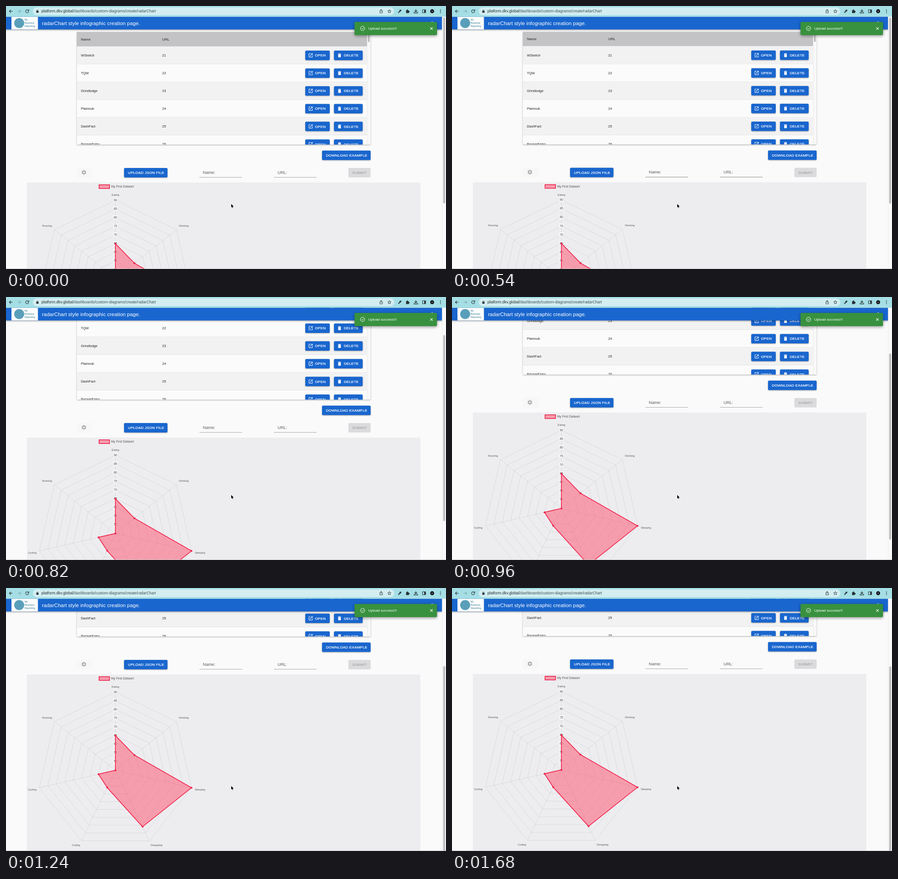
An HTML page with a canvas for the animation above (2.42 s loop, 969 by 578 pixels).

```html
<!DOCTYPE html>
<html lang="en">
<head>
<meta charset="utf-8">
<title>Radar chart page</title>
<style>
html, body { margin: 0; width: 100%; height: 100%; overflow: hidden; background: #fafafa; }
canvas { display: block; width: 969px; height: 578px; }
</style>
</head>
<body>
<canvas id="stage" width="969" height="578"></canvas>
<script>
const ctx = document.getElementById('stage').getContext('2d');
const W = 969, H = 578, LOOP = 2420, TAU = Math.PI * 2;
const FONT = '"Liberation Sans", Arial, sans-serif';
const BLUE = '#1966ce', INK = '#222224', PINK = '#ee1f49';

// time in ms, scroll offset in px
const KEYS = [[0, 0], [440, 0], [540, 0.4], [680, 7.5], [820, 79], [960, 134],
  [1100, 177], [1240, 198], [1560, 199], [LOOP, 199]];

const ROWS = ['WSketch', 'TQW', 'Grindlodge', 'Plainnub', 'DashFact', 'BazaarEntro'];
const OPEN_ICON = new Path2D('M19 19H5V5h7V3H5a2 2 0 0 0-2 2v14a2 2 0 0 0 2 2h14c1.1 0 2-.9 2-2v-7h-2v7zM14 3v2h3.6l-9.8 9.8 1.4 1.4L19 6.4V10h2V3h-7z');
const TRASH_ICON = new Path2D('M6 19c0 1.1.9 2 2 2h8c1.1 0 2-.9 2-2V7H6v12zM19 4h-3.5l-1-1h-5l-1 1H5v2h14V4z');

function slope(i) {
  const d = k => (KEYS[k + 1][1] - KEYS[k][1]) / (KEYS[k + 1][0] - KEYS[k][0]);
  if (i === 0 || i === KEYS.length - 1) return 0;
  const a = d(i - 1), b = d(i);
  return a * b > 0 ? 2 * a * b / (a + b) : 0;
}

function scrollAt(ms) {
  let t = Math.floor(ms / 20) * 20;
  if (t > 1000 && t < 1100) t = 1000;   // the page stalls here
  let i = 0;
  while (i < KEYS.length - 2 && t >= KEYS[i + 1][0]) i++;
  const [t0, y0] = KEYS[i], [t1, y1] = KEYS[i + 1];
  const h = t1 - t0, u = (t - t0) / h, v = 1 - u;
  return y0 * (1 + 2 * u) * v * v + y1 * u * u * (3 - 2 * u)
    + h * u * v * (slope(i) * v - slope(i + 1) * u);
}

function rect(x, y, w, h, color, r = 0) {
  ctx.fillStyle = color;
  ctx.beginPath();
  ctx.roundRect(x, y, w, h, r);
  ctx.fill();
}

function line(points, color, width = 1, closed = false) {
  ctx.beginPath();
  points.forEach(([x, y]) => ctx.lineTo(x, y));
  if (closed) ctx.closePath();
  ctx.strokeStyle = color;
  ctx.lineWidth = width;
  ctx.stroke();
}

function disc(x, y, r, color) {
  ctx.beginPath();
  ctx.arc(x, y, r, 0, TAU);
  ctx.fillStyle = color;
  ctx.fill();
}

function ring(x, y, r, color, width = 1, from = 0, to = TAU) {
  ctx.beginPath();
  ctx.arc(x, y, r, from, to);
  ctx.strokeStyle = color;
  ctx.lineWidth = width;
  ctx.stroke();
}

function text(str, x, y, size, color, align = 'left') {
  ctx.font = `${size}px ${FONT}`;
  ctx.textAlign = align;
  ctx.fillStyle = color;
  ctx.fillText(str, x, y);
}

function shadow(blur, dy, color) {
  ctx.shadowBlur = blur;
  ctx.shadowOffsetY = dy;
  ctx.shadowColor = color;
}

function noShadow() {
  shadow(0, 0, 'transparent');
}

function icon(path, x, y, color) {
  ctx.save();
  ctx.translate(x - 5.76, y - 5.76);
  ctx.scale(0.48, 0.48);
  ctx.fillStyle = color;
  ctx.fill(path, 'evenodd');
  ctx.restore();
}

function button(label, x, y, w, labelX, off = false) {
  if (!off) shadow(2.5, 1, 'rgba(0,0,0,.35)');
  rect(x, y, w, 20.8, off ? '#dbdbdd' : BLUE, 2.3);
  noShadow();
  const color = off ? '#a6a6a8' : '#fff';
  ctx.letterSpacing = '0.23px';
  text(label, labelX, y + 13.2, 8.05, color);
  ctx.strokeStyle = color;
  ctx.lineWidth = 0.22;
  ctx.strokeText(label, labelX, y + 13.2);
  ctx.letterSpacing = '0px';
}

function table() {
  shadow(2.5, 1, 'rgba(0,0,0,.4)');
  rect(156, 57, 647, 247.6, '#fbfbfb', 2);
  noShadow();
  ctx.save();
  ctx.beginPath();
  ctx.rect(156, 57, 647, 247.6);
  ctx.clip();
  rect(156, 57, 639, 31.7, '#c3c3c5');
  text('Name', 165, 75.6, 7.9, INK);
  text('URL', 344, 75.6, 7.9, INK);
  ROWS.forEach((name, i) => {
    const top = 88.9 + 39.05 * i, mid = top + 19.6;
    rect(156, top, 639, 39.05, i % 2 ? '#fbfbfb' : '#f2f2f3');
    rect(156, top + 38.5, 639, 0.7, '#d9d9db');
    text(name, 165, mid + 2.5, 7.45, INK);
    text(String(21 + i), 344, mid + 2.5, 7.45, INK);
    button('OPEN', 659, mid - 10.4, 54, 680.5);
    icon(OPEN_ICON, 671, mid, '#fff');
    button('DELETE', 722.3, mid - 10.4, 63.2, 744);
    icon(TRASH_ICON, 734.5, mid, '#fff');
  });
  rect(795, 57, 8, 248, '#f8f8f8');
  rect(795, 57, 0.6, 248, '#e4e4e4');
  rect(797, 58, 4, 21.5, '#bdbdbf', 2);
  ctx.restore();
}

function gear(x, y) {
  const c = '#adadb0';
  ring(x, y, 3, c, 2.2);
  for (let i = 0; i < 6; i++) {
    const a = i * TAU / 6 + TAU / 12, dx = Math.cos(a), dy = Math.sin(a);
    line([[x + 3 * dx, y + 3 * dy], [x + 5.2 * dx, y + 5.2 * dy]], c, 2.4);
  }
}

function form() {
  button('DOWNLOAD EXAMPLE', 696, 317.8, 107, 704.4);
  rect(156, 355.5, 34, 21.5, '#f7f7f7', 2);
  gear(171.5, 365.6);
  button('UPLOAD JSON FILE', 260, 355.9, 95.6, 268.6);
  text('Name:', 433.5, 368.5, 9.25, '#59595b');
  text('URL:', 598, 368.5, 9.25, '#59595b');
  rect(426, 376, 94, 0.8, '#8c8c8e');
  rect(590, 376, 94, 0.8, '#8c8c8e');
  button('SUBMIT', 754, 355.9, 49, 762.6, true);
}

function radar() {
  const cx = 241, cy = 598.7, step = 19.1;
  const at = (i, value) => {
    const a = i * TAU / 7, r = (value - 45) / 5 * step;
    return [cx + r * Math.sin(a), cy - r * Math.cos(a)];
  };
  const axes = [0, 1, 2, 3, 4, 5, 6];
  rect(46, 388, 866.5, 420, '#ededf0');

  ctx.fillStyle = 'rgba(255,70,98,.48)';
  ctx.fillRect(205, 393, 23, 8);
  ctx.strokeStyle = PINK;
  ctx.lineWidth = 1.6;
  ctx.strokeRect(205, 393, 23, 8);
  text('My First Dataset', 231.5, 399.4, 6.85, '#555');

  for (let v = 50; v <= 90; v += 5)
    line(axes.map(i => at(i, v)), 'rgba(0,0,0,.14)', 0.6, true);
  axes.forEach(i => line([[cx, cy], at(i, 90)], 'rgba(0,0,0,.14)', 0.6));

  for (let v = 50; v <= 90; v += 5) {
    const y = at(0, v)[1] - 0.6;
    rect(cx - 5, y - 4.6, 10, 9.2, 'rgba(255,255,255,.75)');
    text(String(v), cx, y + 2.4, 6.9, '#4c4c4c', 'center');
  }
  const labels = [['Eating', 241, 417.3, 'center'], ['Drinking', 381, 484.6],
    ['Sleeping', 416, 643.4], ['Designing', 319, 765.2], ['Coding', 163.3, 765.2, 'right'],
    ['Cycling', 67, 643.4, 'right'], ['Running', 101.2, 484.6, 'right']];
  labels.forEach(([s, x, y, align]) => text(s, x, y, 5.75, '#555', align));

  const points = [65, 59, 90, 81, 56, 55, 45].map((v, i) => at(i, v));
  ctx.lineJoin = 'round';
  line(points, PINK, 1.7, true);
  ctx.fillStyle = 'rgba(255,70,98,.48)';
  ctx.fill();
  points.forEach(([x, y]) => disc(x, y, 2, PINK));
}

function arrow(x, dir, color) {
  line([[x - 3.5, 11.5], [x + 3.5, 11.5]], color, 1.1);
  line([[x + dir * 0.3, 8.2], [x + dir * 3.6, 11.5], [x + dir * 0.3, 14.8]], color, 1.1);
}

function browserBar() {
  const ink = '#263238';
  rect(0, 0, W, 23.4, '#a5dfe5');
  rect(59, 3, 796, 17, '#d3eef1', 8.5);
  arrow(11, -1, ink);
  arrow(29, 1, '#7fa9b0');
  ring(46.6, 11.5, 3.3, ink, 1.1, 0.3, TAU - 0.7);
  line([[50.3, 7.6], [50.3, 10.6], [47.4, 10.6]], ink, 1.1);
  rect(66.7, 10.6, 5, 4.2, ink, 0.6);
  ring(69.2, 10.3, 1.6, ink, 0.9, Math.PI, TAU);

  const host = 'platform.dkv.global';
  text(host, 78, 14.4, 8.45, '#1f2b30');
  const hostWidth = ctx.measureText(host).width;
  text('/dashboards/custom-diagrams/create/radarChart', 78 + hostWidth, 14.4, 8.45, '#3e4f55');

  line([[825, 10], [823.4, 10], [823.4, 15.2], [829, 15.2], [829, 10], [827.4, 10]], ink, 0.9);
  line([[826.2, 12.6], [826.2, 7.4]], ink, 0.9);
  line([[824.5, 9], [826.2, 7.3], [827.9, 9]], ink, 0.9);
  const star = Array.from({ length: 10 }, (_, i) => {
    const r = i % 2 ? 1.8 : 4, a = i * TAU / 10;
    return [844.3 + r * Math.sin(a), 11.7 - r * Math.cos(a)];
  });
  line(star, ink, 0.9, true);

  line([[864, 14.8], [867.8, 11]], ink, 2);
  line([[866.3, 8.9], [869.6, 12.2]], ink, 1.2);
  line([[867.8, 10.7], [870, 8.5]], ink, 2.8);
  rect(881, 9.4, 6.2, 6.2, ink, 0.8);
  disc(884, 9, 1.5, ink);
  disc(887.4, 12.4, 1.5, ink);
  line([[902.6, 7.2], [902.6, 12.4]], ink, 1.3);
  line([[899.8, 10], [902.6, 12.8], [905.4, 10]], ink, 1.3);
  line([[898.7, 13], [898.7, 15.4], [906.5, 15.4], [906.5, 13]], ink, 1.2);
  line([[917.3, 8.2], [924, 8.2], [924, 14.8], [917.3, 14.8]], ink, 1.1, true);
  rect(921, 8, 3.2, 7, ink);
  disc(938.5, 11.5, 4.4, '#15171c');
  disc(938.5, 11.5, 1.2, '#8d8fa8');
  [8.4, 11.5, 14.6].forEach(y => disc(956.8, y, 0.95, ink));
}

function header() {
  shadow(3, 1, 'rgba(0,0,0,.35)');
  rect(0, 23.4, 960.5, 28.2, BLUE);
  noShadow();
  rect(12, 24, 58.3, 27.6, '#fdfdfd');
  disc(29, 37.5, 11, '#5a9fba');
  ['ML', 'Business', 'Reporting'].forEach((s, i) =>
    text(s, 41, 32.2 + i * 6.7, 5.3, '#2c7894'));
  text('radarChart style infographic creation page.', 79.3, 41.8, 11.43, '#fff');
  text('Marlena', 903, 40.2, 8, '#fff');
  ring(938.5, 38.5, 4, '#fff', 1);
}

function toast() {
  shadow(6, 2, 'rgba(0,0,0,.4)');
  rect(767.5, 35, 181.7, 29, '#38913f', 2.3);
  noShadow();
  ring(785.3, 49.3, 4.7, '#fff', 1);
  line([[782.9, 49.3], [784.7, 51.1], [788, 47.6]], '#fff', 1);
  text('Upload success!!!', 797.8, 52, 7.98, '#fff');
  line([[934.3, 46.8], [939.7, 52.2]], '#fff', 1.1);
  line([[939.7, 46.8], [934.3, 52.2]], '#fff', 1.1);
}

function cursor(x, y) {
  const shape = [[0, 0], [0, 8], [1.8, 6.3], [3, 9], [4.2, 8.5], [3, 5.8], [5.5, 5.7]]
    .map(([dx, dy]) => [x + dx, y + dy]);
  line(shape, '#fff', 1.3, true);
  ctx.fillStyle = '#000';
  ctx.fill();
}

function draw(ms) {
  const y = scrollAt(ms);
  rect(0, 0, W, H, '#fafafa');
  ctx.save();
  ctx.translate(0, -y);
  table();
  form();
  radar();
  ctx.restore();
  header();
  rect(960.5, 23.4, 8.5, H - 23.4, '#f9f9f9');
  rect(960.5, 23.4, 0.6, H - 23.4, '#e6e6e6');
  rect(962.7, 25 + y * 0.74, 4.6, 409, '#bfbfc1', 2.3);
  browserBar();
  toast();
  rect(0, 577, W, 1, '#c2c4c6');
  cursor(496, 435);
}

const start = performance.now();
function tick() {
  draw((performance.now() - start) % LOOP);
  requestAnimationFrame(tick);
}
tick();
</script>
</body>
</html>
```
